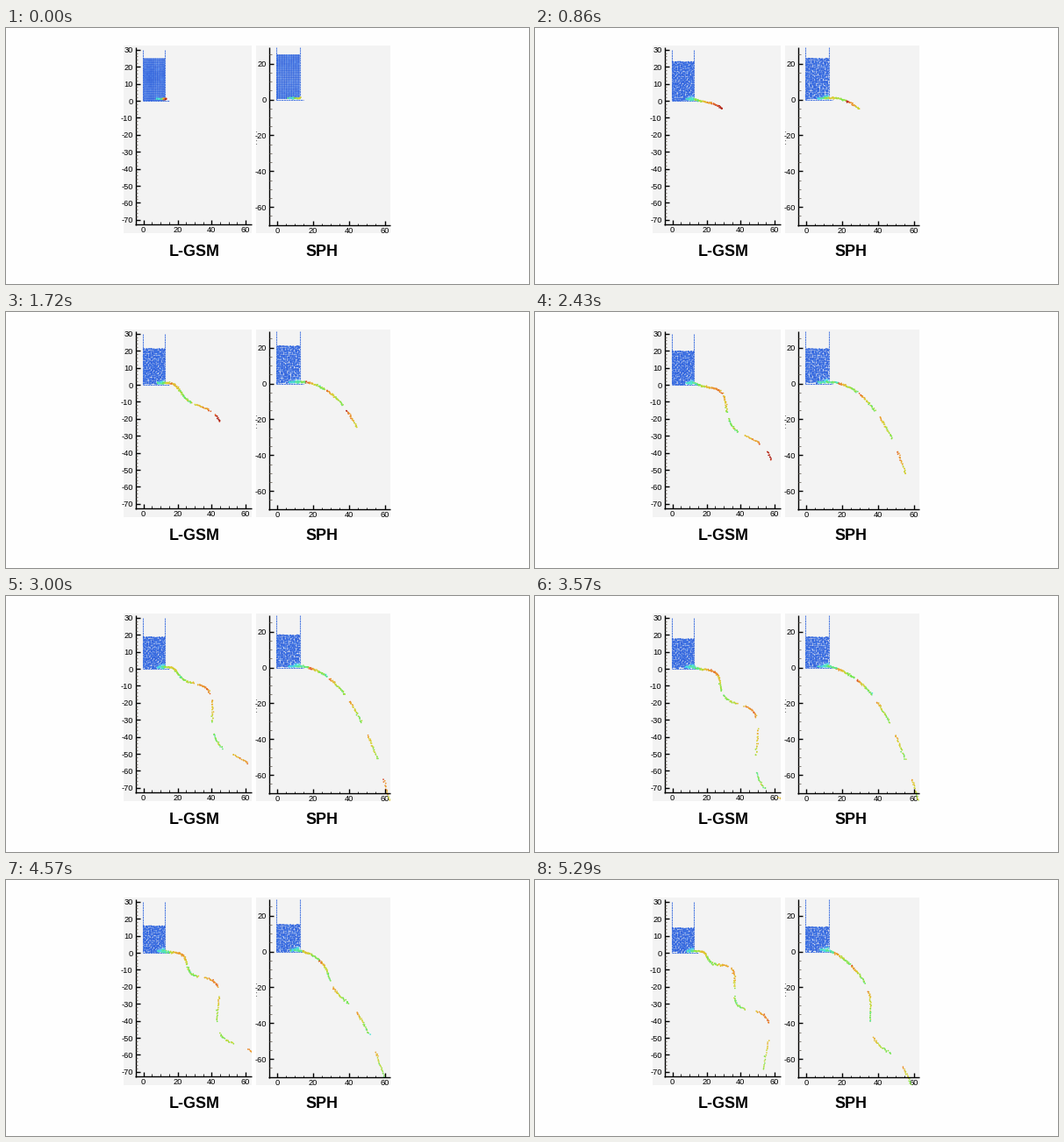
A matplotlib script for the animation above (5.43 s loop, 596x292 px).

```python
import numpy as np
import matplotlib.pyplot as plt
from matplotlib.animation import FuncAnimation
from matplotlib.colors import LinearSegmentedColormap
from matplotlib.patches import Rectangle

W, H, DPI = 596, 292, 128
PT = 72 / DPI  # points per pixel
LOOP, TICK, STEPS = 5430, 30, 38  # ms, ms, simulation steps per loop

plt.rcParams["font.family"] = "Liberation Sans"
SPEED = LinearSegmentedColormap.from_list("speed", [
    (0, "#2f62dc"), (0.2, "#4a86f0"), (0.38, "#45e2ee"), (0.52, "#6fe84a"),
    (0.66, "#dcd430"), (0.8, "#ee9a2c"), (0.92, "#dc4a22"), (1, "#a81e18")])

fig = plt.figure(figsize=(W / DPI, H / DPI), dpi=DPI, facecolor="#fefefe")
ax = fig.add_axes([0, 0, 1, 1])
ax.set_xlim(0, W)
ax.set_ylim(H, 0)
ax.axis("off")


class Jet:
    """Parcels in free fall from a nozzle; the stream tears at regular intervals."""

    def __init__(self, nozzle, speed, gravity, start, tear, period, lean, heat, seed):
        self.x0, self.y0 = nozzle
        self.v, self.g = speed, gravity
        self.lean, self.heat = lean, heat
        rng = np.random.default_rng(seed)
        self.tau = np.arange(start, STEPS + 2, 0.1)  # release times
        self.cycle = (self.tau - tear) / period
        self.shake = rng.normal(0, 0.5, (len(self.tau), 2))
        self.tint = rng.normal(0, 0.05, len(self.tau))

    def at(self, n):
        tau, age = self.tau, n - self.tau
        drift = self.lean(tau, age) * age
        x = self.x0 + self.v * age + drift
        y = self.y0 + self.g / 2 * np.maximum(age, 0) ** 2 - drift * (age > 0)
        hot = self.heat(tau, age, self.cycle % 1) + 0.15 * np.exp(-np.abs(tau) / 3)
        ramp = np.clip((age + 0.8) / (1 + 2.5 * np.clip(tau / 20, 0, 1)), 0, 1)
        level = 0.4 + (hot - 0.4) * ramp + self.tint
        torn = np.cos(2 * np.pi * self.cycle) > 1.3 - 0.055 * age
        show = (age > -1.7) & ~torn
        return (np.column_stack([x, y]) + self.shake)[show], level[show]


class Tank:
    """Water particles between two walls, sinking as the head drains away."""

    PITCH = 1.95

    def __init__(self, left, right, floor, head, drain, seed):
        self.right, self.floor = right, floor
        self.head, self.drain = head, drain
        rng = np.random.default_rng(seed)
        cols = np.linspace(left + 1.3, right - 1.1, 13)
        rows = np.arange(0, head, self.PITCH)
        self.grid = np.stack(np.meshgrid(cols, rows), -1).reshape(-1, 2)
        self.shake = rng.uniform(-0.5, 0.5, self.grid.shape)
        self.tint = np.abs(rng.normal(0, 0.05, len(self.grid)))

    def at(self, n):
        top = self.floor - (np.sqrt(self.head) - self.drain * n) ** 2
        settle = min(n / 4, 1)
        xy = self.grid + [0, top + 0.7] + self.shake * settle
        dx, dy = (xy - [self.right, self.floor - 2]).T
        reach = 4 + 7 * settle
        near = np.clip(1.7 * (1 - np.hypot(dx, 2.3 * dy) / reach), 0, 1)
        keep = xy[:, 1] < self.floor - 0.3
        return xy[keep], np.maximum(self.tint, 0.42 * near)[keep]


def wave_lean(tau, age):
    """Nozzle direction sways, a little faster with time."""
    u = tau - 6
    return -0.3 - 0.6 * np.cos(2 * np.pi * (0.0904 * u + 0.00096 * u ** 2))


def wave_heat(tau, age, phase):
    return 0.74 + 0.25 * wave_lean(tau, age)


def surge_lean(tau, age):
    """Slow loss of reach, with one weak pulse late in the run."""
    pulse = np.exp(-((tau - 22.5) / 3) ** 2) * age / 13
    return 0.6 - 0.05 * age - 0.0012 * tau ** 2 - pulse


def surge_heat(tau, age, phase):
    return 0.5 + 0.42 * phase ** 2


def segment(x, y, width=1.4, color="black", **kw):
    ax.plot(x, y, color=color, lw=width * PT, solid_capstyle="butt", **kw)


def label(x, y, text, size=9.3, **kw):
    ax.text(x, y, text, fontsize=size * PT, va="center_baseline", color="black", **kw)


def axes_box(box, corner, zero, unit, y_major, y_minor):
    """Grey panel with a ruled left and bottom edge."""
    x0, y0, x1, y1 = box
    cx, cy = corner
    zx, zy = zero
    panel = ax.add_patch(Rectangle((x0, y0), x1 - x0, y1 - y0, fc="#f3f3f3", lw=0))
    segment([cx, cx], [22, cy + 0.6], zorder=4)
    segment([cx - 0.6, x1], [cy, cy], zorder=4)
    for v in y_minor:
        y = zy - v * unit
        segment([cx, cx + 2.8], [y, y], 0.8, "#6a6258", zorder=4)
    for v in y_major:
        y = zy - v * unit
        segment([cx, cx + 5], [y, y], zorder=4)
        label(cx - 2.9, y + 0.2, f"{v}", ha="right")
    for v in range(-5, 66, 5):
        x = zx + v * unit
        if cx < x < x1:
            major = v % 20 == 0
            segment([x, x], [cy - (5 if major else 2.6), cy],
                    1.4 if major else 0.8, zorder=4)
            if major:
                label(x, cy + 5.6, f"{v}", ha="center")
    return panel


def vessel(left, right, top, floor):
    style = dict(width=1.1, color="#5580e2", dashes=(2, 0.5), zorder=2)
    segment([left, left], [top, floor], **style)
    segment([right, right], [top, floor - 4], **style)
    segment([left, right + 4.5], [floor, floor], **style)


def dots(panel, size, z):
    sc = ax.scatter([], [], s=(size * PT) ** 2, c=[], cmap=SPEED, vmin=0, vmax=1,
                    lw=0, zorder=z)
    sc.set_clip_path(panel)
    return sc


left = axes_box((134, 20, 279.5, 234), (147.6, 224), (156.7, 82.9), 1.94,
                range(30, -71, -10), range(28, -72, -2))
right = axes_box((284.5, 20, 438, 234), (299.8, 225.2), (308.8, 81.5), 2.045,
                 range(20, -61, -20), range(25, -70, -5))
vessel(156.1, 181.2, 25, 83)
vessel(308.1, 334.8, 22, 81.7)
label(215.2, 253.6, "L-GSM", 17.9, ha="center", weight="bold")
label(360, 253.6, "SPH", 17.9, ha="center", weight="bold")
ax.scatter([285, 284.5, 285.2], [118, 128, 131.5], s=(1.2 * PT) ** 2, c="#777777", lw=0)

parts = [
    (Tank(156.1, 181.2, 83, 48.2, 0.044, 3), dots(left, 2.25, 2)),
    (Tank(308.1, 334.8, 81.7, 51.2, 0.05, 4), dots(right, 2.25, 2)),
    (Jet((180, 81), 4.8, 0.6, -0.6, 4.0, 3.08, wave_lean, wave_heat, 5),
     dots(left, 1.7, 3)),
    (Jet((332, 80), 5.4, 0.63, -0.8, 2.2, 4.1, surge_lean, surge_heat, 8),
     dots(right, 1.7, 3)),
]


def draw(tick):
    # the picture holds for several ticks, then jumps to the next step
    n = (tick * TICK + 20) * STEPS // LOOP
    for body, sc in parts:
        xy, level = body.at(n)
        sc.set_offsets(xy)
        sc.set_array(np.clip(level, 0, 1))
    return [sc for _, sc in parts]


anim = FuncAnimation(fig, draw, frames=LOOP // TICK, interval=TICK,
                     repeat=True, repeat_delay=0)
plt.show()
```
